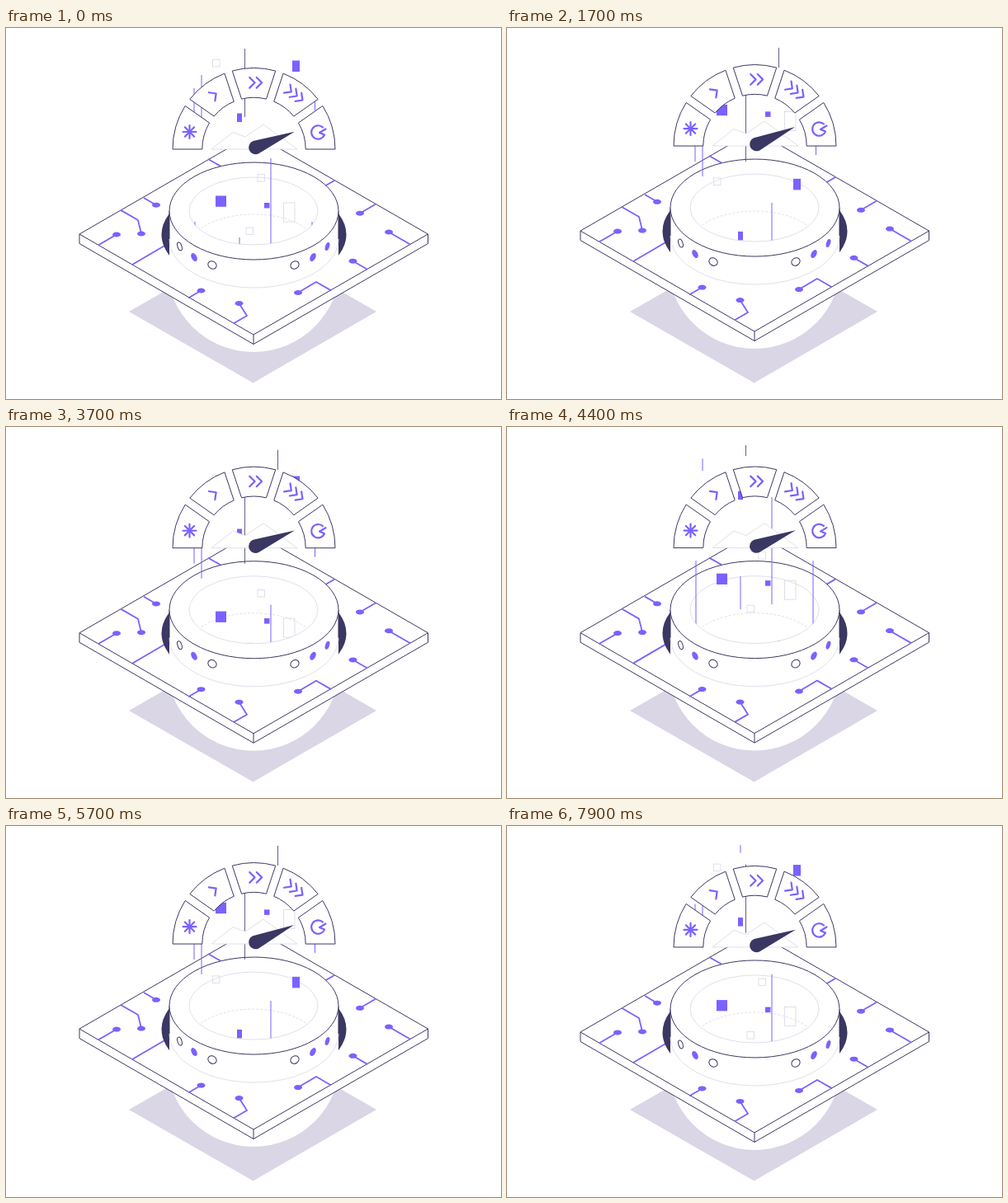
These frames come from a looping animation (600x450 px, 8000 ms). An HTML page:

```html
<!DOCTYPE html>
<html lang="en">
<head>
<meta charset="utf-8">
<title>Speed dial</title>
<style>
  html, body { margin: 0; width: 100%; height: 100%; overflow: hidden; background: #fff; }
  svg { display: block; width: 600px; height: 450px; }
  path, ellipse { stroke-linejoin: round; }
  .ink { fill: #fff; stroke: #3b3763; }
  .edge { fill: none; stroke: #3b3763; }
  .pale { fill: none; stroke: #d9d7e6; stroke-width: .8; }
  .icon { fill: none; stroke: #7b61ff; stroke-width: 2.2; stroke-linecap: round; }
  .trace { fill: none; stroke: #7b61ff; stroke-width: 1.8; }
  .dot { fill: #7b61ff; }
  .dark { fill: #3b3763; }
  .white { fill: #fff; }
  .ray { stroke: #7b61ff; }
  .thin { stroke: #3b3763; stroke-width: .8; }
</style>
</head>
<body>
<svg viewBox="0 0 600 450">
  <defs>
    <clipPath id="beam"><path d="M222 63A78 41 0 0 1 378 63V222A78 41 0 0 1 222 222Z"/></clipPath>
    <clipPath id="bowl"><ellipse cx="300" cy="222" rx="78" ry="41"/></clipPath>
    <clipPath id="sides"><path d="M180 200H198V300H180ZM403 200H421V300H403Z"/></clipPath>
  </defs>
  <path fill="#dad6e6" d="M149 344L299.500 258L449 344L299.500 430.500Z"/>
  <g id="scene">
    <circle class="white" cx="300" cy="288" r="105"/>
    <path class="ink" d="M89 250V261.500L300 383.500L511.500 261.500V250L300 128Z"/>
    <path class="edge" d="M89 250L300 372L511.500 250M300 372V383.500"/>
    <g id="traces"></g>
    <ellipse class="dark" cx="300.500" cy="250.500" rx="112" ry="63" clip-path="url(#sides)"/>
    <path class="white" d="M198 222V256A102.500 59 0 0 0 403 256V222Z"/>
    <path class="pale" d="M198 256A102.500 59 0 0 0 403 256"/>
    <path class="edge" d="M198 222V256M403 222V256"/>
    <ellipse class="ink" cx="300.500" cy="222" rx="102.500" ry="59"/>
    <ellipse class="pale" cx="300" cy="222" rx="78" ry="41"/>
    <ellipse class="pale" cx="300" cy="267" rx="78" ry="41" stroke-dasharray="3 2" clip-path="url(#bowl)"/>
    <g id="ports"></g>
    <g clip-path="url(#beam)">
      <g id="lines"></g>
      <g id="blocks"></g>
    </g>
    <path class="white" d="M249 147L275 126.500L290 132L312 117L353 147Z"/>
    <path class="pale" d="M249 147L275 126.500L290 132L312 117L353 147Z"/>
    <g id="tiles"></g>
    <g id="icons"></g>
    <path id="needle" class="dark" d="M349.500 124.800L306.500 152.200A8.300 8.300 0 1 1 299.500 137.200Z"/>
  </g>
</svg>
<script>
const BLOCK_GAP = 254, LINE_GAP = 362, SLOPE = 0.578, TILE_STEP = 36.6;
const $ = id => document.getElementById(id);

function add(parent, tag, attrs) {
  const el = document.createElementNS('http://www.w3.org/2000/svg', tag);
  for (const k in attrs) el.setAttribute(k, attrs[k]);
  $(parent).appendChild(el);
}

// A trace ends in a dot; by default it runs dx along an isometric axis
function trace(x, y, dx, dir, bend = '') {
  add('traces', 'path', { class: 'trace', d: `M${x} ${y}${bend}l${dx} ${dx * dir * SLOPE}` });
  add('traces', 'ellipse', { class: 'dot', cx: x, cy: y, rx: 5, ry: 3 });
}
trace(182, 214.7, -15, 1);
trace(134, 250.5, -22, -1);
trace(429, 224.7, 19, -1);
trace(464, 247.5, 26, 1);
trace(420.5, 282.7, 17.5, 1);
trace(236.5, 318.5, -15.5, -1);
trace(164, 249.5, -21, 1, 'l-4 -16.5');
trace(354, 321, 18, 1, 'l22 -13');
trace(282.5, 334, -16, -1, 'l9.500 15');
add('traces', 'path', { class: 'trace', d: 'M153 287L194 263M245 159L260 167.500M386 192L398 185' });

// Ports on the ring wall, mirrored about the middle
function port(dx, cy, rx, ry, tilt, left, right) {
  for (const side of [-1, 1]) {
    const cx = 300 + side * dx;
    add('ports', 'ellipse', {
      class: side < 0 ? left : right, cx, cy, rx, ry, transform: `rotate(${side * tilt} ${cx} ${cy})`
    });
  }
}
port(89.5, 265, 2.5, 5.2, 18, 'ink', 'dot');
port(72, 278, 3.2, 5.4, 28, 'dot', 'dot');
port(50, 287.5, 5.4, 4.5, -35, 'ink', 'ink');

// Dial tiles: equal wedges with parallel gaps between them
function rim(r, side, edge) {
  const inset = Math.asin(4.9 / r) * 180 / Math.PI;
  const deg = Math.min(180, Math.max(0, edge - side * inset));
  const a = deg * Math.PI / 180;
  return `${300.5 - r * Math.cos(a)} ${147 - r * Math.sin(a)}`;
}
for (let k = -2; k <= 2; k++) {
  const from = k === -2 ? -9 : 90 + (k - 0.5) * TILE_STEP;
  const to = k === 2 ? 189 : 90 + (k + 0.5) * TILE_STEP;
  add('tiles', 'path', {
    class: 'ink',
    d: `M${rim(98.5, -1, from)}A98.500 98.500 0 0 1 ${rim(98.5, 1, to)}` +
       `L${rim(62.7, 1, to)}A62.700 62.700 0 0 0 ${rim(62.7, -1, from)}Z`
  });
}

function chevrons(x, y, turn, count) {
  let d = '';
  for (let i = 0; i < count; i++) d += `M${(i - (count - 1) / 2) * 8.5 - 3} -6.300l6.300 6.300l-6.300 6.300`;
  add('icons', 'path', { class: 'icon', d, transform: `translate(${x} ${y}) rotate(${turn})` });
}
chevrons(252, 81.5, -TILE_STEP, 1);
chevrons(302.5, 66.3, 0, 2);
chevrons(350, 80.5, TILE_STEP, 3);
for (let i = 0; i < 4; i++) {
  add('icons', 'path', { class: 'icon', d: 'M-8 0H8', transform: `translate(222.500 126) rotate(${i * 45})` });
}
add('icons', 'path', { class: 'icon', d: 'M384 120.500A8.200 8.200 0 1 0 386 129.500L380 127L387.500 122.500' });

// Rising parts are drawn twice, one gap apart, so that the lift can wrap
function block(x, y, width, height, kind) {
  for (const dy of [0, BLOCK_GAP]) add('blocks', 'rect', { class: kind, x, y: y + dy, width, height });
}
function line(x, y, len, kind = 'ray') {
  for (const dy of [0, LINE_GAP]) add('lines', 'path', { class: kind, d: `M${x} ${y + dy}v${len}` });
}
block(254, 203.5, 13, 13.3, 'dot');
block(313, 212, 6.5, 6.5, 'dot');
block(347, 39.5, 9, 13.5, 'dot');
block(280, 103.5, 6, 10.5, 'dot');
block(336.5, 212, 13.5, 23, 'pale');
for (const [x, y] of [[305, 177.5], [291, 242], [250.5, 38.5]]) block(x, y, 8.5, 8.5, 'pale');

line(289.5, 25, 83, 'thin');
line(329.5, -30, 24, 'thin');
line(321, 158, 130);
line(283, -4, 15);
line(283, 254, 40);
line(228, 73, 35);
line(237, 57, 69);
line(374.5, 82, 18);
for (const side of [-1, 1]) line(300 + side * 71, 235, 85);

const lift = (id, y) => $(id).setAttribute('transform', `translate(0 ${y.toFixed(2)})`);

function draw(ms) {
  // Ten pictures a second, each taken from a 25 fps clock
  const step = Math.floor((ms % 8000 + 2) / 100) % 80;
  const t = Math.floor(step * 2.5) * 40;
  const sway = Math.cos(t / 4000 * 2 * Math.PI);
  lift('scene', 2.1 * (sway - 1));
  lift('blocks', -BLOCK_GAP * (t % 4000) / 4000);
  lift('lines', -LINE_GAP * (t % 2000) / 2000);
  $('needle').setAttribute('transform', `rotate(${1.3 * sway} 303.500 145)`);
}

const start = performance.now();
function tick() {
  draw(performance.now() - start);
  requestAnimationFrame(tick);
}
draw(0);
requestAnimationFrame(tick);
</script>
</body>
</html>
```
